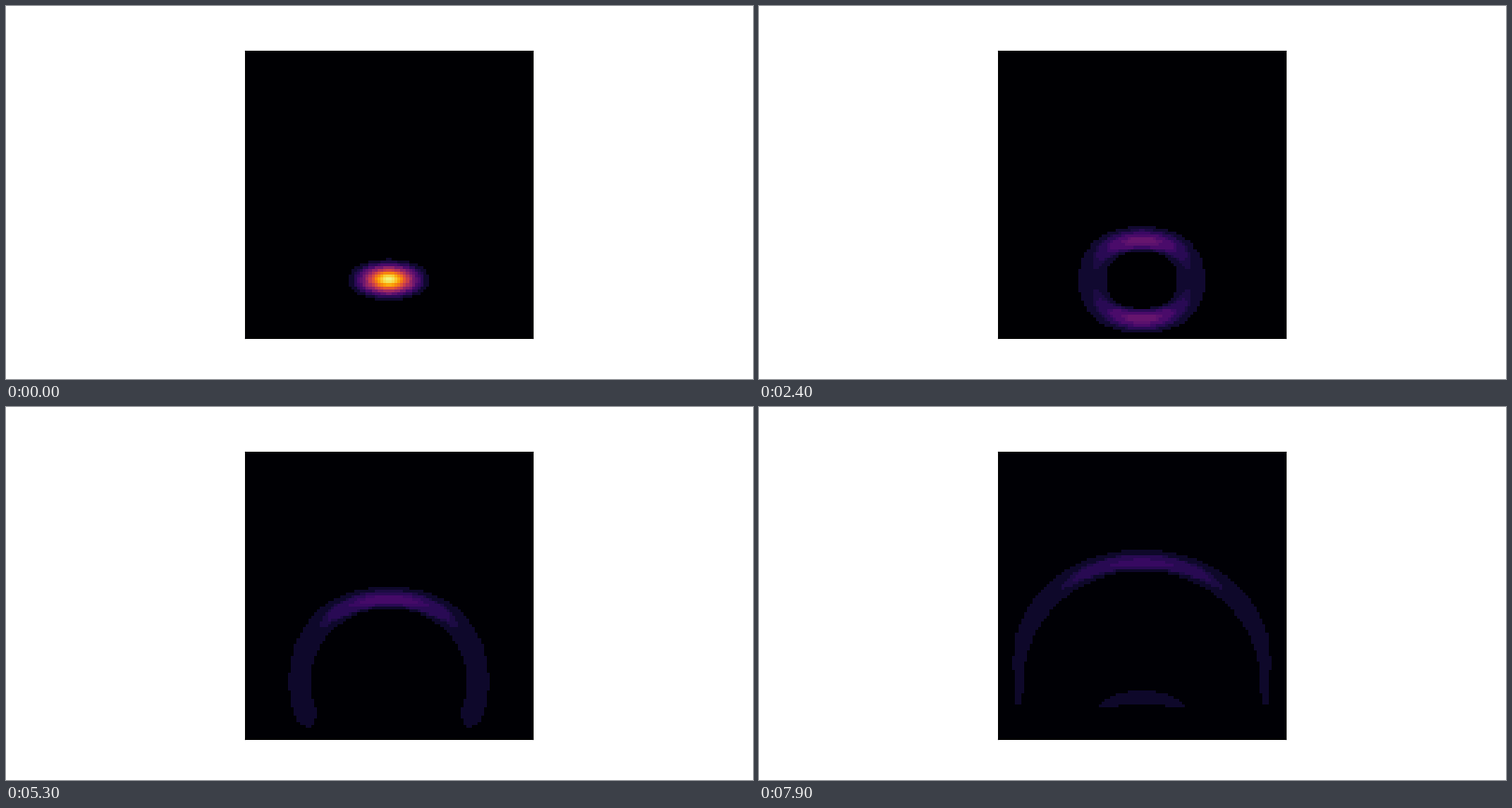
Write a matplotlib script that moves like this. It is 800 by 400 pixels and loops after 8000 ms.

```python
import numpy as np
import matplotlib.pyplot as plt
from matplotlib.animation import FuncAnimation

N = 100          # grid cells per side
STEPS = 80
COURANT = 0.5    # c * dt / dx
INFERNO = plt.get_cmap("inferno")


def initial_pulse():
    x, y = np.meshgrid(np.linspace(0, 1, N), np.linspace(0, 1, N))
    return np.exp(-((x - 0.5) / 0.06) ** 2 / 2 - ((y - 0.2) / 0.03) ** 2 / 2)


def clamp_edges(u):
    u[0] = u[-1] = 0
    u[:, 0] = u[:, -1] = 0
    return u


def laplacian(u):
    lap = np.zeros_like(u)
    lap[1:-1, 1:-1] = (u[2:, 1:-1] + u[:-2, 1:-1] + u[1:-1, 2:]
                       + u[1:-1, :-2] - 4 * u[1:-1, 1:-1])
    return lap


def solve_wave():
    """Leapfrog solution of the 2D wave equation with fixed edges."""
    now = clamp_edges(initial_pulse())
    prev = now.copy()
    history = []
    for _ in range(STEPS):
        nxt = 2 * now - prev + COURANT ** 2 * laplacian(now)
        prev, now = now, clamp_edges(nxt)
        history.append(now)
    return history


def shade(u):
    """Colour the field in flat tones: the mean of each coarse RGB bucket."""
    rgb = INFERNO(np.clip(u, 0, 1), bytes=True)[..., :3].reshape(-1, 3).astype(int)
    r, g, b = (rgb // [32, 16, 32]).T
    _, group = np.unique((r * 16 + g) * 8 + b, return_inverse=True)
    group = group.ravel()
    size = np.bincount(group)
    means = [np.bincount(group, weights=channel) / size for channel in rgb.T]
    tones = np.stack(means, axis=1).astype(np.uint8)
    return tones[group].reshape(N, N, 3)


waves = solve_wave()

fig, ax = plt.subplots(figsize=(8, 4), dpi=100, facecolor="white")
ax.set_xticks([])
ax.set_yticks([])
image = ax.imshow(shade(waves[0]), origin="lower", interpolation="nearest")


def update(i):
    image.set_data(shade(waves[i]))
    return [image]


anim = FuncAnimation(fig, update, frames=STEPS, interval=100,
                     repeat=True, repeat_delay=0)
plt.show()
```
